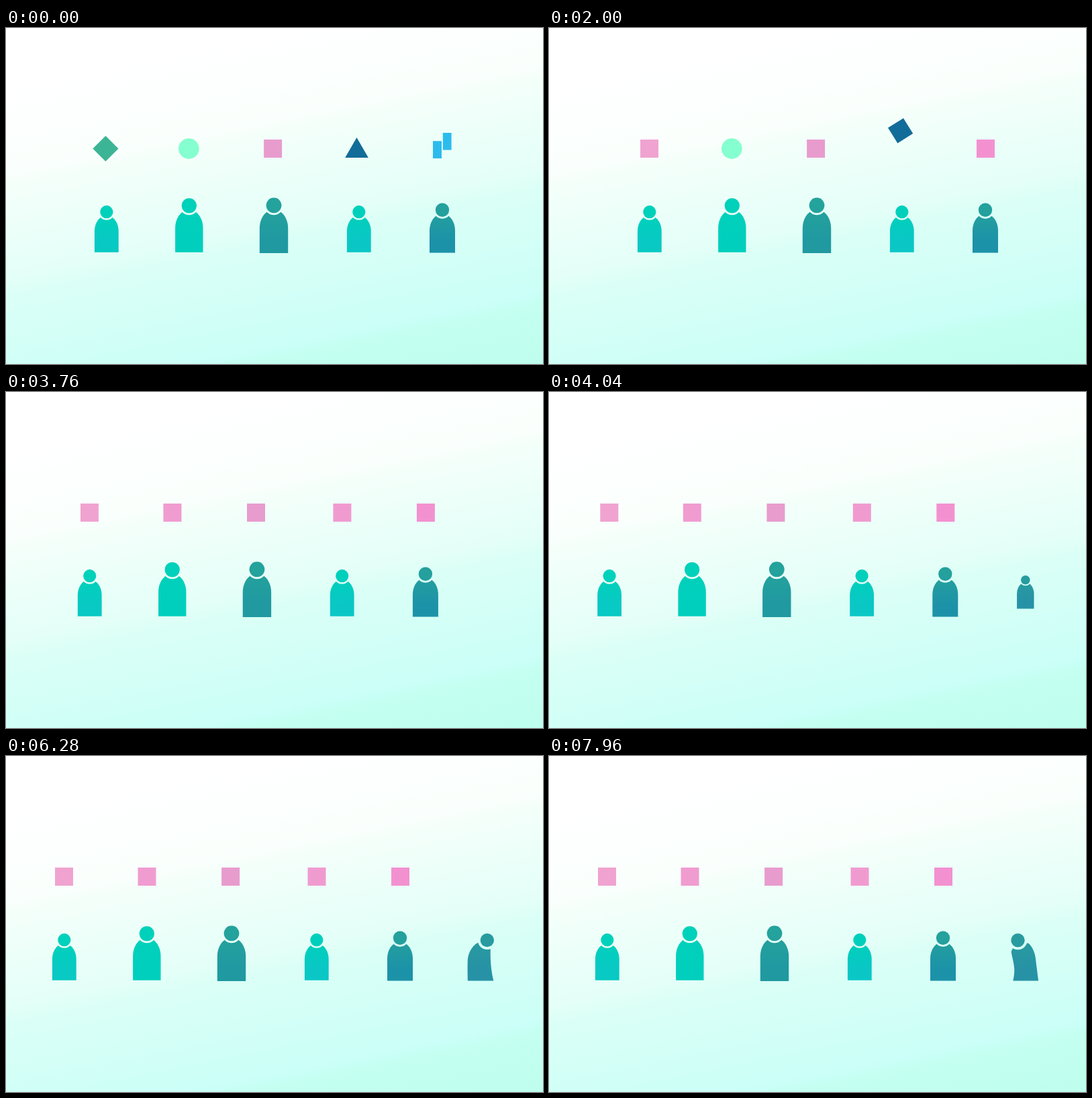
Write an HTML page with a canvas that moves like this. It is 800 by 500 pixels and loops after 8000 ms.

```html
<!DOCTYPE html>
<html lang="en">
<head>
<meta charset="utf-8">
<title>Shapes and people</title>
<style>
  html, body { margin: 0; width: 100%; height: 100%; overflow: hidden; background: #fff; }
  canvas { display: block; width: 800px; height: 500px; }
</style>
</head>
<body>
<canvas id="stage" width="800" height="500"></canvas>
<script>
const ctx = document.getElementById('stage').getContext('2d');
const LOOP = 8000, ROW_Y = 179.5, HALF = 13.5, JUMP = 680;

const clamp = v => Math.min(1, Math.max(0, v));
const progress = (t, start, length) => clamp((t - start) / length);
const lerp = (a, b, k) => a + (b - a) * k;
const lerpAll = (a, b, k) => a.map((v, i) => lerp(v, b[i], k));
const easeQuad = p => p < .5 ? 2 * p * p : 1 - 2 * (1 - p) ** 2;
const easeCubic = p => p < .5 ? 4 * p ** 3 : 1 - 4 * (1 - p) ** 3;
const easeBack = p => 1 + 2 * (p - 1) ** 3 + (p - 1) ** 2;

// Polygons morph from the first point list to the second.
const box = (l, t, r, b) => [l, t, r, t, r, b, l, b];
const square = box(-HALF, -HALF, HALF, HALF);
const shapes = [
  { x: 148.4, endX: 149.5, color: '#3bb596', pink: '#f0a3d0', start: 128, rise: 30, turn: 45,
    parts: [[square, square]] },
  { x: 272.3, endX: 273, color: '#85ffcf', pink: '#f09cd0', start: 2470, rise: 29, round: 15.3 },
  { x: 397.6, endX: 397.6, color: '#e89ccd', pink: '#e89ccd', start: LOOP, rise: 0,
    parts: [[square, square]] },
  { x: 522.5, endX: 526, color: '#126c99', pink: '#f09bd0', start: 1728, rise: 28,
    parts: [[[0, -16.5, 0, -16.5, 17.3, HALF, -17.3, HALF], square]] },
  { x: 649.8, endX: 650.5, color: '#2dbbee', pink: '#f391d0', start: 928, rise: 32,
    parts: [[box(-13.8, -11.3, -.8, 14.5), box(-HALF, -HALF, .2, HALF)],
            [box(1, -23.5, 13.8, 2), box(0, -HALF, HALF, HALF)]] }
];

// Body outline: a start point and four cubic curves, measured from the middle of the base.
const upright = {
  body: [-19, 0, -19, -11, -19, -22, -19, -33, -19, -47, -10.5, -58, 0, -58,
         10.5, -58, 19, -47, 19, -33, 19, -22, 19, -11, 19, 0],
  head: [0, -63.7, 12.9]
};
const leanRight = {
  body: [-22, 0, -22, -10, -22.5, -20, -22, -31, -21, -43, -14, -54, -6, -57,
         2, -56, 12, -52, 12, -46, 11.5, -30, 13, -14, 16.5, 0],
  head: [7, -60.5, 14]
};
const leanLeft = {
  body: [-18.5, 0, -14, -18, -18, -26, -21, -42, -21, -52, -6, -57, 4, -56,
         9, -53, 14, -43, 15, -34, 16.5, -22, 18, -10, 19.3, 0],
  head: [-11.3, -60.3, 14]
};
const HEAD_R = 10.2;

const people = [
  { x: 149.8, base: 333.7, half: 17.9, colors: ['#00d1bb', '#08c9c3'] },
  { x: 272.8, base: 333.7, half: 20.7, colors: ['#00d1ba', '#00cfbd'] },
  { x: 399, base: 335, half: 21.2, colors: ['#24a29c', '#2099a1'] },
  { x: 525.8, base: 333.7, half: 17.9, colors: ['#00d0bb', '#0ac7c6'] },
  { x: 650, base: 334.5, half: 19, colors: ['#24a09d', '#1c92a8'] }
];
const newcomer = { x: 709.8, base: 334.6, half: 19, colors: ['#289b9f', '#2792a6'] };

function linear(x, y, stops) {
  const g = ctx.createLinearGradient(0, 0, x, y);
  stops.forEach(([at, color]) => g.addColorStop(at, color));
  return g;
}

const DEPTH = 650;
const backdrop = linear(.2 * DEPTH, .98 * DEPTH, [
  [90, '#ffffff'], [215, '#f9fffc'], [232, '#f4fffa'], [365, '#e4fff8'], [390, '#dbfff6'],
  [465, '#d3fff7'], [548, '#cafff7'], [562, '#c4fff1'], [650, '#befeed']
].map(([depth, color]) => [depth / DEPTH, color]));

function drawBackdrop() {
  ctx.fillStyle = backdrop;
  ctx.fillRect(0, 0, 800, 500);
}

function polygon(p) {
  ctx.moveTo(p[0], p[1]);
  for (let i = 2; i < p.length; i += 2) ctx.lineTo(p[i], p[i + 1]);
  ctx.closePath();
}

function drawShape(s, t, slide) {
  const p = progress(t, s.start, JUMP);
  const morph = easeQuad(clamp(p / .42));
  const tint = clamp((p - .5) / .3);
  ctx.save();
  ctx.translate(lerp(s.x, s.endX, easeQuad(p)) - slide, ROW_Y - s.rise * Math.sin(Math.PI * p));
  ctx.rotate(lerp(s.turn || 0, 180, easeQuad(p)) * Math.PI / 180);
  ctx.beginPath();
  if (s.round) {
    const h = lerp(s.round, HALF, morph);
    ctx.roundRect(-h, -h, 2 * h, 2 * h, s.round * (1 - morph));
  } else {
    s.parts.forEach(([from, to]) => polygon(lerpAll(from, to, morph)));
  }
  if (tint < 1) {
    ctx.fillStyle = s.color;
    ctx.fill();
  }
  ctx.globalAlpha = tint;
  ctx.fillStyle = s.pink;
  ctx.fill();
  ctx.restore();
}

function drawPerson(person, x, pose, grow = 1) {
  const k = person.half / 19, middle = -37;
  const [hx, hy, gap] = pose.head, b = pose.body;
  ctx.save();
  ctx.translate(x, person.base);
  ctx.scale(k, k);
  ctx.translate(0, middle);
  ctx.scale(grow, grow);
  ctx.translate(0, -middle);
  ctx.fillStyle = linear(0, -60, [[0, person.colors[1]], [.3, person.colors[1]], [1, person.colors[0]]]);

  ctx.beginPath();
  ctx.arc(hx, hy, HEAD_R, 0, 7);
  ctx.fill();

  // Keep a clear ring between head and shoulders.
  ctx.beginPath();
  ctx.rect(-60, -100, 120, 120);
  ctx.arc(hx, hy, gap, 0, 2 * Math.PI);
  ctx.clip('evenodd');
  ctx.beginPath();
  ctx.moveTo(b[0], b[1]);
  for (let i = 2; i < b.length; i += 6) ctx.bezierCurveTo(...b.slice(i, i + 6));
  ctx.closePath();
  ctx.fill();
  ctx.restore();
}

function mixPose(a, b, k) {
  return { body: lerpAll(a.body, b.body, k), head: lerpAll(a.head, b.head, k) };
}

function newcomerPose(t) {
  const right = easeCubic(progress(t, 5200, 600));
  const left = easeCubic(progress(t, 6760, 640));
  return left > 0 ? mixPose(leanRight, leanLeft, left) : mixPose(upright, leanRight, right);
}

function render(t) {
  const slide = 63 * easeCubic(progress(t, 3330, 930));
  drawBackdrop();
  shapes.forEach(s => drawShape(s, t, slide));
  people.forEach(p => drawPerson(p, p.x - slide, upright));
  const grow = easeBack(progress(t, 3960, 360));
  if (grow > 0) drawPerson(newcomer, newcomer.x, newcomerPose(t), grow);
}

const begin = performance.now();
function tick() {
  render((performance.now() - begin) % LOOP);
  requestAnimationFrame(tick);
}
tick();
</script>
</body>
</html>
```
